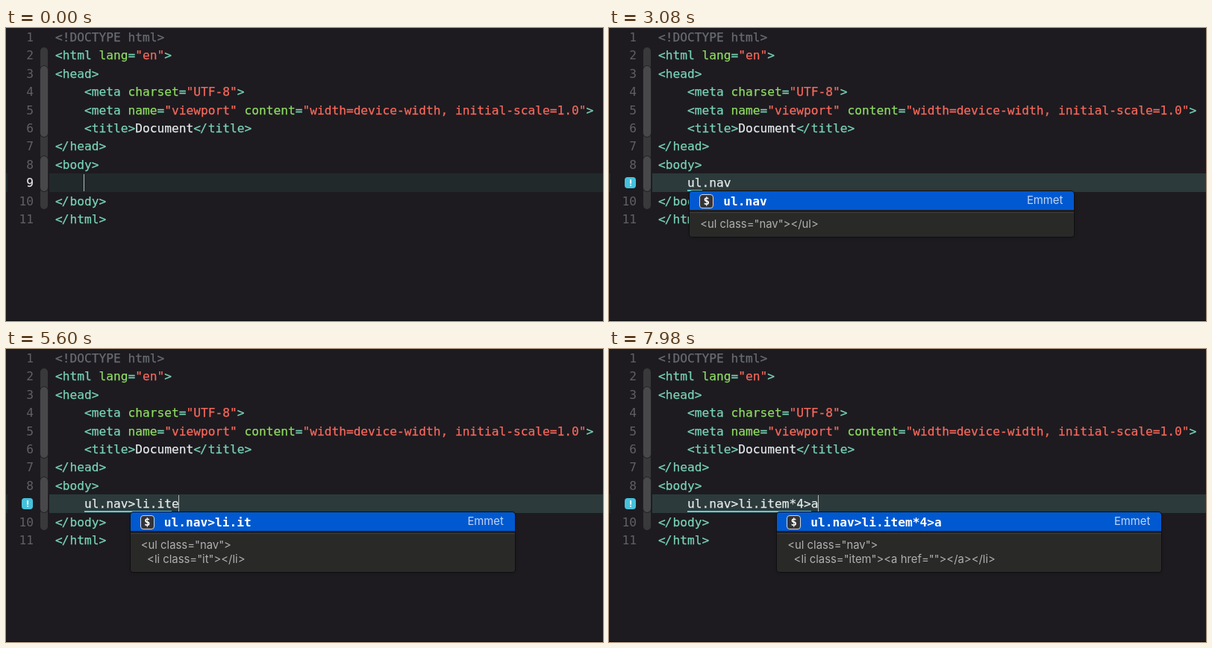
Recreate the animation shown at these times as an HTML page. Size 800 by 393 pixels, loop 8 s.

```html
<!DOCTYPE html>
<html lang="en">
<head>
<meta charset="UTF-8">
<title>Typing an abbreviation</title>
<style>
  html, body { margin: 0; width: 100%; height: 100%; overflow: hidden; background: #1d1b20; }
  #stage {
    position: absolute; left: 0; top: 0; width: 800px; height: 393px; overflow: hidden;
    background: #1d1b20; color: #e4e9ea;
    font: 400 16.195px/24.4px "DejaVu Sans Mono", monospace;
    font-variant-ligatures: none; white-space: pre;
  }
  #stage div { position: absolute; box-sizing: border-box; }
  #edge { left: 0; top: 392px; width: 800px; height: 1px; background: #0d0d0f; }

  .code { left: 66px; }
  .code, #typed { -webkit-text-stroke: 0.25px; }
  .number { left: 0; width: 37px; text-align: right; color: #605f64; }
  .number.current { color: #e2e2e4; -webkit-text-stroke: 0.25px; }
  .doctype { color: #676c72; }
  .tag { color: #78d2b5; }
  .attr { color: #8edb61; }
  .string { color: #f8685b; }
  .slash { position: relative; left: -1px; }

  .fold { left: 46px; width: 10px; border-radius: 5px; background: #39393c; }
  .fold.inner { background: #48484b; box-shadow: 0 0 0 1px #222125; }

  #band { left: 58px; top: 195px; width: 742px; height: 25px; background: #22292b; }
  #mark { left: 0; top: 195px; width: 2px; height: 25px; background: #20292b; }
  .invalid #band { background: #2c3a3b; }
  .invalid .current { visibility: hidden; }
  #badge { left: 21px; top: 200px; width: 15px; height: 15px; border-radius: 4px; background: #45c1dc; visibility: hidden; }
  .invalid #badge { visibility: visible; }
  #badge::before, #badge::after { content: ""; position: absolute; left: 6.5px; width: 2px; background: #fff; border-radius: 1px; }
  #badge::before { top: 3px; height: 5.5px; }
  #badge::after { top: 10px; height: 2px; }

  #typed { left: 105px; top: 196px; }
  #underline { left: 105px; top: 217px; height: 2px; background: #62cbd3; }
  #caret { top: 196px; width: 1px; height: 23px; background: #b5b8ba; }

  #popup {
    top: 219px; width: 515px; border-radius: 4px; overflow: hidden;
    background: #1e1e20; box-shadow: 0 0 0 1px #0f0f11, 0 1px 4px #0004;
  }
  .row { left: 0; width: 100%; height: 25px; line-height: 25px; }
  .row.selected { background: #0059d0; color: #fff; }
  .row .label { left: 45px; top: 1px; }
  .row b { font-weight: 700; }
  .icon {
    left: 13px; top: 4px; width: 19px; height: 19px; border: 1.5px solid #d5d5d7; border-radius: 4px;
    background: #343437; color: #fff; text-align: center; font: 700 14px/16px "DejaVu Sans Mono", monospace;
  }
  .icon.element { background: #77777a; font-size: 12px; letter-spacing: -1.5px; }
  .source { right: 15px; top: 0; font: 400 14.8px/25px Inter, sans-serif; color: #c2d5f3; }
  .preview {
    left: 0; width: 100%; padding: 6px 14px 0; background: #292928; border-top: 1px solid #414141;
    color: #b0b0b0; font: 400 14.85px/19px Inter, sans-serif;
  }
</style>
</head>
<body>
<div id="stage">
  <div id="band"></div>
  <div id="mark"></div>
  <div id="edge"></div>
  <div id="badge"></div>
  <div id="typed"></div>
  <div id="underline"></div>
  <div id="caret"></div>
  <div id="popup"></div>
</div>
<script>
const LOOP = 8000, CHAR = 9.75, LINE = 24.4, TEXT_X = 105;
const POPUP_DELAY = 140, BLINK = 500;
const abbreviation = 'ul.nav>li.item*4>a';
const keyTimes = [1050, 1470, 1890, 2100, 2310, 2520, 3290, 4130, 4410,
                  4760, 5110, 5320, 5530, 5740, 6160, 6510, 7140, 7630];
const lines = [
  '<!DOCTYPE html>',
  '<html lang="en">',
  '<head>',
  '    <meta charset="UTF-8">',
  '    <meta name="viewport" content="width=device-width, initial-scale=1.0">',
  '    <title>Document</title>',
  '</head>',
  '<body>',
  '',
  '</body>',
  '</html>'
];

const find = id => document.getElementById(id);
const stage = find('stage'), typed = find('typed'), underline = find('underline');
const caret = find('caret'), popup = find('popup');
const escapeHtml = s => s.replace(/&/g, '&amp;').replace(/</g, '&lt;').replace(/>/g, '&gt;');
const span = (kind, s) => `<span class="${kind}">${escapeHtml(s)}</span>`;

function highlight(line) {
  if (line.startsWith('<!')) return span('doctype', line);
  return line.replace(/"[^"]*"|<\/|<[a-z]+|[a-z]+(?=[=>])|[=>]|\w+/g, (token, at) => {
    if (token[0] === '"') return span('string', token);
    if (token === '</') return span('tag', '<') + span('tag slash', '/');
    if (line[at + token.length] === '=') return span('attr', token);
    return /^[A-Z]/.test(token) ? token : span('tag', token);
  });
}

function add(className, top, html = '') {
  const el = document.createElement('div');
  el.className = className;
  el.style.top = top + 'px';
  el.innerHTML = html;
  stage.insertBefore(el, typed);
  return el;
}

lines.forEach((line, i) => {
  const top = i * LINE + 0.9;
  add(i === 8 ? 'number current' : 'number', top, i + 1);
  add('code', top, highlight(line));
});
for (const [kind, top, bottom] of [['fold', 26, 243], ['fold inner', 50.5, 146], ['fold inner', 172, 218.5]])
  add(kind, top).style.height = bottom - top + 'px';

// Expands an abbreviation the way the completion preview shows it.
function expand(text) {
  const elements = text.split('>').map(part => {
    const [name, cls] = part.split('*')[0].split('.');
    const attrs = cls ? ` class="${cls}"` : name === 'a' ? ' href=""' : '';
    return [`<${name}${attrs}>`, `</${name}>`];
  });
  const nest = list => list.reduceRight((inner, [open, close]) => open + inner + close, '');
  return elements.length === 1 ? [nest(elements)] : [elements[0][0], '  ' + nest(elements.slice(1))];
}

const row = (index, icon, label, extra) =>
  `<div class="row ${index ? '' : 'selected'}" style="top:${index * 25.5}px">${icon}` +
  `<div class="label">${label}</div>${extra}</div>`;

function drawPopup(count) {
  popup.style.display = count ? 'block' : 'none';
  if (!count) return;
  const text = abbreviation.slice(0, count), preview = expand(text);
  const rows = [row(0, '<div class="icon">$</div>', `<b>${escapeHtml(text)}</b>`, '<div class="source">Emmet</div>')];
  if (count === 1) rows.push(row(1, '<div class="icon element">&lt;/</div>', '<b>u</b>l', ''));
  const previewTop = 28 + (rows.length - 1) * 24, previewHeight = 14.5 + preview.length * 18.5;
  popup.style.left = 59.5 + (count - 1) * CHAR + 'px';
  popup.style.height = previewTop + previewHeight + 'px';
  popup.innerHTML = rows.join('') +
    `<div class="preview" style="top:${previewTop}px;height:${previewHeight}px">${escapeHtml(preview.join('\n'))}</div>`;
}

// Separators close the list; other keys refresh it after a short delay.
function popupCount(t, count) {
  if (!count || /[.>*]/.test(abbreviation[count - 1])) return 0;
  if (t >= keyTimes[count - 1] + POPUP_DELAY) return count;
  return count > 1 && !/[.>*]/.test(abbreviation[count - 2]) ? count - 1 : 0;
}

let lastState = '';
function frame() {
  const t = performance.now() % LOOP;
  const count = keyTimes.filter(k => k <= t).length;
  const shown = popupCount(t, count);
  const state = count + '/' + shown;
  if (state !== lastState) {
    lastState = state;
    typed.textContent = abbreviation.slice(0, count);
    stage.classList.toggle('invalid', count > 2);
    underline.style.width = (count < 3 ? 0 : count < 7 ? 2 : count - 1) * CHAR + 'px';
    caret.style.left = TEXT_X - 0.6 + count * CHAR + 'px';
    drawPopup(shown);
  }
  const idle = t - (count ? keyTimes[count - 1] : 0);
  caret.style.visibility = Math.floor(idle / BLINK) % 2 ? 'hidden' : 'visible';
  requestAnimationFrame(frame);
}
frame();
</script>
</body>
</html>
```
